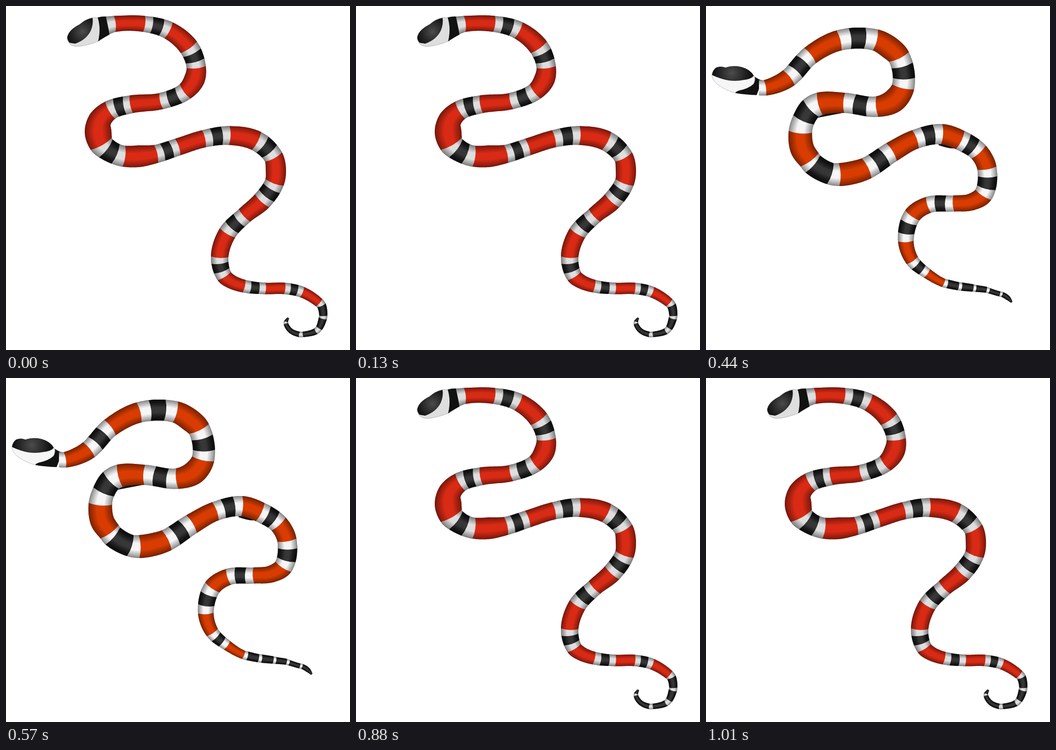
Write an HTML page with a canvas that moves like this. It is 747 px wide and 749 px high and loops after 1.1 s.

```html
<!DOCTYPE html>
<html lang="en">
<head>
<meta charset="utf-8">
<title>Snake</title>
<style>
html, body { margin: 0; width: 100%; height: 100%; overflow: hidden; background: #fff; }
canvas { display: block; }
</style>
</head>
<body>
<canvas id="stage" width="747" height="749"></canvas>
<script>
const W = 747, H = 749, HOLD = 220, STEPS = 20;
const ORDER = [0, 1, 2, 1, 0];

// Spine rows: x, y, width, then the band that follows (r red, w white, k black, o white-black-white ring).
const curled = {
  red: '#d82a14', white: '#dedede', glow: [166, 56, 34],
  head: 'M133 68Q136 52 160 40Q176 26 190 25L206 26Q214 50 204 75Q190 82 165 87Q148 90 140 84Q133 78 133 68Z',
  dark: ['M133 68Q136 52 160 40Q174 28 188 26Q190 40 184 54Q174 74 150 82L138 80Q133 74 133 68Z',
    'M199 25Q210 22 219 23L225 62Q214 68 200 77Q204 60 203 46Q202 34 199 25Z'],
  spine: [
    [221, 42, 38, 'w'], [236, 39, 34, 'r'], [300, 39, 34, 'o'], [353, 53, 38, 'r'],
    [397, 90, 42, 'o'], [413, 133, 41, 'r'], [409, 160, 44, 'r'], [389, 186, 38, 'o'],
    [337, 207, 35, 'r'], [272, 214, 38, 'o'], [226, 227, 42, 'r'], [204, 249, 50, 'r'],
    [200, 274, 57, 'r'], [207, 300, 52, 'w'], [217, 310, 48, 'k'], [238, 322, 45, 'w'],
    [256, 327, 45, 'r'], [290, 327, 46, 'r'], [326, 322, 39, 'o'], [373, 307, 37, 'r'],
    [430, 289, 37, 'o'], [485, 282, 40, 'r'], [544, 294, 43, 'o'], [581, 329, 41, 'r'],
    [586, 356, 43, 'r'], [583, 384, 41, 'o'], [556, 424, 41, 'r'], [518, 456, 36, 'o'],
    [481, 494, 38, 'r'], [464, 546, 37, 'o'], [474, 588, 33, 'r'], [489, 600, 30, 'r'],
    [517, 610, 27, 'o'], [563, 615, 24, 'r'], [605, 615, 24, 'o'], [643, 623, 23, 'r'],
    [680, 646, 20, 'w'], [685, 652, 19, 'k'], [689, 674, 17, 'w'], [688, 680, 17, 'k'],
    [680, 701, 14, 'w'], [673, 708, 13, 'k'], [645, 715, 11, 'w'], [637, 715, 11, 'k'],
    [618, 707, 10, 'k'], [608, 692, 9, 'w'], [608, 688, 8, 'k'], [613, 679, 3]
  ]
};

const middle = {
  red: '#cd3500', white: '#f6f6f6', glow: [146, 106, 38],
  head: 'M115 142Q116 128 126 104Q134 84 165 79L180 80 192 100 185 125Q168 140 146 156Q134 163 124 158Q115 152 115 142Z',
  dark: ['M115 142Q117 126 126 104Q134 84 164 79Q172 92 166 112Q158 140 138 153Q124 156 118 151Z',
    'M174 74Q188 66 190 60L208 92Q196 112 183 127Q180 122 184 104Q183 86 174 74Z'],
  spine: [
    [198, 78, 37, 'w'], [212, 68, 34, 'r'], [268, 47, 37, 'o'], [322, 42, 37, 'r'],
    [376, 58, 41, 'o'], [424, 100, 40, 'r'], [431, 132, 46, 'r'], [431, 157, 46, 'o'],
    [382, 208, 40, 'r'], [325, 211, 41, 'o'], [264, 217, 42, 'r'], [231, 230, 45, 'r'],
    [211, 249, 46, 'w'], [202, 271, 48, 'k'], [202, 304, 50, 'w'], [209, 318, 50, 'r'],
    [238, 339, 46, 'r'], [271, 345, 44, 'o'], [330, 333, 40, 'r'], [371, 313, 38, 'o'],
    [426, 288, 38, 'r'], [465, 283, 38, 'r'], [499, 284, 39, 'o'], [546, 295, 37, 'r'],
    [572, 311, 41, 'r'], [590, 332, 41, 'o'], [594, 391, 43, 'r'], [580, 412, 44, 'r'],
    [558, 432, 39, 'o'], [502, 462, 38, 'r'], [470, 490, 35, 'o'], [448, 541, 38, 'r'],
    [455, 564, 36, 'r'], [469, 584, 30, 'o'], [510, 608, 26, 'r'], [546, 616, 22, 'o'],
    [584, 617, 21, 'r'], [622, 619, 18, 'w'], [629, 621, 17, 'k'], [658, 629, 17, 'w'],
    [663, 631, 17, 'k'], [687, 640, 15, 'w'], [692, 644, 14, 'k'], [713, 661, 12, 'w'],
    [717, 667, 11, 'k'], [723, 694, 9, 'w'], [722, 701, 8, 'k'], [714, 718, 3]
  ]
};

const stretched = {
  red: '#d83c00', white: '#f6f6f6', glow: [56, 146, 40],
  head: 'M13 148Q12 160 24 170Q42 184 66 190L105 172 106 154Q80 160 60 160Q30 160 13 148Z',
  dark: ['M13 150Q14 140 22 134Q32 130 42 134Q60 128 78 133Q96 138 104 152Q96 160 82 161Q58 166 36 159Q20 154 13 150Z',
    'M122 162L110 194Q86 193 66 190Q60 188 72 184Q92 180 103 170Q108 162 106 154Q114 160 122 162Z',
    'M240 236L312 230Q280 236 244 243Z', 'M505 299L546 308Q536 314 505 303Z'],
  spine: [
    [115, 178, 32, 'w'], [128, 178, 33, 'r'], [155, 170, 37, 'r'], [180, 156, 40, 'o'],
    [226, 108, 41, 'r'], [289, 75, 44, 'o'], [368, 74, 46, 'r'], [399, 91, 49, 'r'],
    [419, 111, 47, 'o'], [428, 176, 48, 'r'], [408, 206, 51, 'r'], [372, 219, 44, 'o'],
    [301, 211, 43, 'r'], [247, 213, 49, 'w'], [228, 223, 49, 'k'], [212, 248, 48, 'w'],
    [205, 274, 50, 'r'], [209, 311, 51, 'r'], [225, 335, 48, 'w'], [232, 344, 48, 'k'],
    [270, 365, 47, 'w'], [289, 367, 49, 'r'], [322, 362, 49, 'r'], [349, 353, 47, 'o'],
    [403, 318, 44, 'r'], [455, 290, 41, 'o'], [512, 279, 43, 'r'], [552, 292, 43, 'o'],
    [592, 318, 41, 'r'], [610, 353, 41, 'o'], [602, 411, 40, 'r'], [575, 427, 36, 'r'],
    [538, 430, 34, 'o'], [483, 433, 35, 'r'], [448, 456, 37, 'o'], [434, 512, 33, 'r'],
    [448, 554, 28, 'o'], [480, 582, 22, 'r'], [516, 603, 18, 'w'], [524, 605, 18, 'k'],
    [548, 610, 17, 'w'], [555, 611, 17, 'k'], [580, 614, 15, 'w'], [586, 615, 14, 'k'],
    [609, 618, 12, 'w'], [615, 620, 11, 'k'], [638, 627, 10, 'w'], [643, 628, 10, 'k'],
    [656, 636, 9, 'k'], [664, 645, 3]
  ]
};

// Smooth curve through the spine: samples with centre, width and unit tangent.
function sample(spine) {
  const gap = i => Math.hypot(spine[i + 1][0] - spine[i][0], spine[i + 1][1] - spine[i][1]);
  const last = spine.length - 1;
  const slope = (i, k) => (spine[i + 1][k] - spine[i][k]) / gap(i);
  const tangent = (i, k) => (slope(Math.max(i - 1, 0), k) + slope(Math.min(i, last - 1), k)) / 2;
  const line = [];
  for (let i = 0; i < last; i++) {
    for (let j = i ? 1 : 0; j <= STEPS; j++) {
      const u = j / STEPS, v = 1 - u, h = gap(i);
      line.push([0, 1, 2].map(k =>
        v * v * (1 + 2 * u) * spine[i][k] + u * u * (3 - 2 * u) * spine[i + 1][k] +
        h * u * v * (v * tangent(i, k) - u * tangent(i + 1, k))));
    }
  }
  return line.map(([x, y, w], i) => {
    const a = line[Math.max(i - 1, 0)], b = line[Math.min(i + 1, line.length - 1)];
    const d = Math.hypot(b[0] - a[0], b[1] - a[1]) || 1;
    return { x, y, w: w + 1, tx: (b[0] - a[0]) / d, ty: (b[1] - a[1]) / d };
  });
}

// Strip of the body between samples a and b, with a rounded tail side.
function strip(line, scale, a = 0, b = line.length - 1) {
  const path = new Path2D(), end = line[b];
  const edge = (p, s) => [p.x - p.ty * p.w * s / 2, p.y + p.tx * p.w * s / 2];
  for (let i = a; i <= b; i++) path.lineTo(...edge(line[i], scale));
  path.quadraticCurveTo(end.x + end.tx * end.w * .14, end.y + end.ty * end.w * .14, ...edge(end, -scale));
  for (let i = b; i >= a; i--) path.lineTo(...edge(line[i], -scale));
  path.closePath();
  return path;
}

function paint({ red, white, glow, head, dark, spine }) {
  const canvas = document.createElement('canvas');
  canvas.width = W;
  canvas.height = H;
  const g = canvas.getContext('2d');
  const fill = (path, color, rule = 'nonzero') => {
    g.fillStyle = color;
    g.fill(path, rule);
  };

  const sheen = g.createRadialGradient(glow[0], glow[1], 0, ...glow);
  sheen.addColorStop(0, '#4c4c4c');
  sheen.addColorStop(1, '#121212');
  const skull = new Path2D(head);
  fill(skull, white);
  g.strokeStyle = 'rgba(0,0,0,.25)';
  g.stroke(skull);
  dark.forEach(d => fill(new Path2D(d), sheen));

  // Bands go from tail to head, so each one covers the start of the next.
  const line = sample(spine), colors = { r: red, w: white, k: '#181818' };
  const band = (kind, a, b) => {
    const start = Math.max(a - 2, 0);
    fill(strip(line, 1, start, b), colors[kind]);
    if (kind === 'k') {
      for (const s of [.7, .55, .4, .25]) fill(strip(line, s, start, b), 'rgba(255,255,255,.035)');
    }
  };
  for (let i = spine.length - 2; i >= 0; i--) {
    const a = i * STEPS, b = a + STEPS, kind = spine[i][3];
    if (kind === 'o') {
      band('w', a + 14, b);
      band('k', a + 6, a + 14);
      band('w', a, a + 6);
    } else band(kind, a, b);
  }

  // Darken the flanks step by step.
  const body = strip(line, 1);
  for (const s of [.96, .93, .86, .78, .69, .59, .48, .36]) {
    const rim = new Path2D(body);
    rim.addPath(strip(line, s));
    fill(rim, 'rgba(0,0,0,.08)', 'evenodd');
  }
  return canvas;
}

const poses = [curled, middle, stretched].map(paint);
const ctx = document.getElementById('stage').getContext('2d');

function draw() {
  const step = Math.floor(performance.now() / HOLD) % ORDER.length;
  ctx.fillStyle = '#fff';
  ctx.fillRect(0, 0, W, H);
  ctx.drawImage(poses[ORDER[step]], 0, 0);
  requestAnimationFrame(draw);
}
draw();
</script>
</body>
</html>
```
